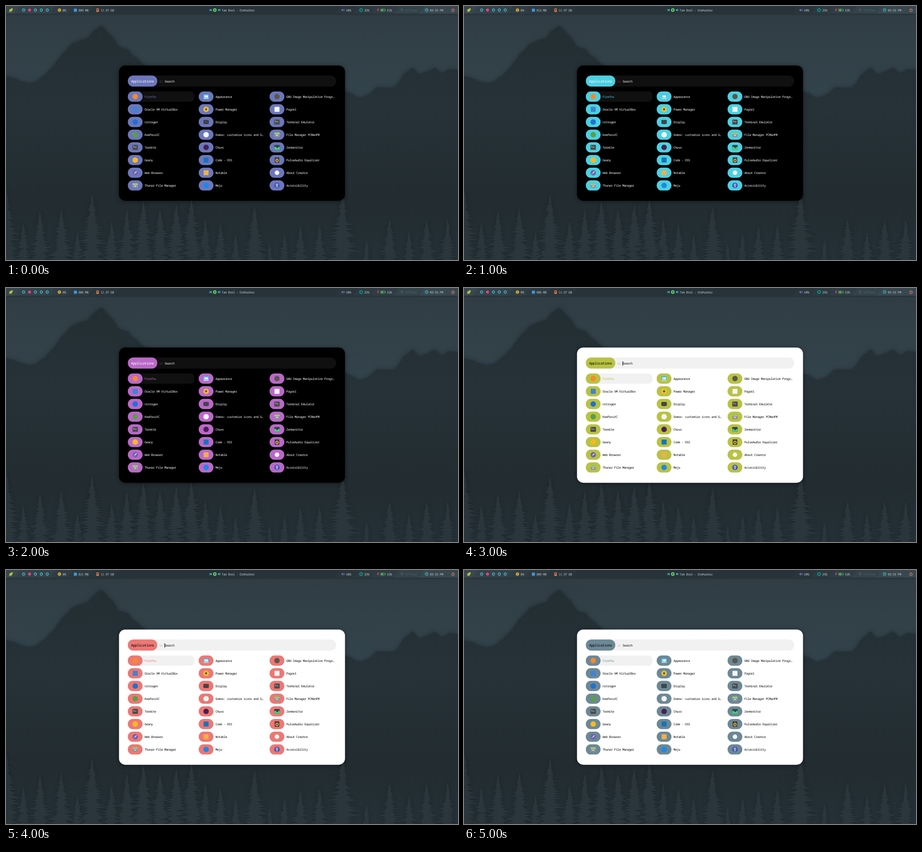
An HTML page that plays this animation: 998x561 px, repeating every 6 s.

```html
<!DOCTYPE html>
<html lang="en">
<head>
<meta charset="utf-8">
<title>Application launcher themes</title>
<style>
html, body { margin: 0; width: 100%; height: 100%; overflow: hidden; background: #232d32; }
svg { display: block; width: 998px; height: 561px; animation: theme 6s step-end infinite; }
text {
  font: 6.75px "Noto Sans Mono", "DejaVu Sans Mono", monospace;
  letter-spacing: -.06em; white-space: pre; text-rendering: geometricPrecision;
}
.bar text { fill: #c3ccd0; }
.bar .muted { fill: #536168; }
.panel { fill: var(--panel); filter: drop-shadow(0 1px 5px rgba(0,0,0,.45)); }
.field { fill: var(--field); }
.accent { fill: var(--accent); }
.ink { fill: var(--ink); }
.title { fill: var(--ink); font-size: 7.8px; }
.caret { fill: #000; opacity: var(--caret); }
.mountains { filter: drop-shadow(0 0 5px rgba(10,18,22,.5)); }
.trees { fill: #2a363c; filter: drop-shadow(0 1px 4px rgba(12,18,22,.4)); }
.bar { filter: drop-shadow(0 1px 2px rgba(0,0,0,.3)); }
.slot { visibility: hidden; animation: slot 6s step-end infinite; }
.charge-low { animation: slot 6s step-end infinite; }
.charge-high { animation: after 6s step-end infinite; }
@keyframes theme {
  0%       { --accent: #6c77bb; --panel: #000; --field: #101010; --ink: #fff; --caret: 0; }
  16.6666% { --accent: #4dd0e1; --panel: #000; --field: #101010; --ink: #fff; --caret: 0; }
  33.3333% { --accent: #ba68c8; --panel: #000; --field: #101010; --ink: #fff; --caret: 0; }
  50%      { --accent: #b9c244; --panel: #fff; --field: #f1f1f1; --ink: #000; --caret: 1; }
  66.6666% { --accent: #ec7875; --panel: #fff; --field: #f1f1f1; --ink: #000; --caret: 1; }
  83.3333%, 100% { --accent: #6d8895; --panel: #fff; --field: #f1f1f1; --ink: #000; --caret: 0; }
}
@keyframes slot { 0% { visibility: visible; } 16.6666%, 100% { visibility: hidden; } }
@keyframes after { 0% { visibility: hidden; } 16.6666%, 100% { visibility: visible; } }
</style>
</head>
<body>
<svg id="stage" viewBox="0 0 998 561" xmlns="http://www.w3.org/2000/svg"></svg>
<script>
const rect = (x, y, w, h, r, fill) =>
  `<rect x="${x}" y="${y}" width="${w}" height="${h}" rx="${r}" fill="${fill}"/>`;
const themed = (cls, x, y, w, h, r) =>
  `<rect class="${cls}" x="${x}" y="${y}" width="${w}" height="${h}" rx="${r}"/>`;
const disc = (x, y, r, fill) => `<circle cx="${x}" cy="${y}" r="${r}" fill="${fill}"/>`;
const ring = (x, y, r, stroke, w = 1) =>
  `<circle cx="${x}" cy="${y}" r="${r}" fill="none" stroke="${stroke}" stroke-width="${w}"/>`;
const shape = (d, fill) => `<path d="${d}" fill="${fill}"/>`;
const line = (d, stroke, w = 1) =>
  `<path d="${d}" fill="none" stroke="${stroke}" stroke-width="${w}" stroke-linecap="round" stroke-linejoin="round"/>`;
const label = (x, y, str, cls = "", style = "") =>
  `<text x="${x}" y="${y}" class="${cls}" style="${style}">${str}</text>`;

let seed = 7;
const random = () => (seed = (seed * 16807) % 2147483647) / 2147483647;

// Adds small bumps along a polyline.
function rugged(points, size = 1.6) {
  const out = [];
  points.forEach(([x, y], i) => {
    out.push(`${x} ${y}`);
    const next = points[i + 1];
    if (!next) return;
    const n = Math.max(1, Math.round(Math.hypot(next[0] - x, next[1] - y) / 6));
    for (let k = 1; k < n; k++) {
      const t = k / n, bump = () => (random() - .5) * 2 * size;
      out.push(`${(x + (next[0] - x) * t + bump()).toFixed(1)} ${(y + (next[1] - y) * t + bump()).toFixed(1)}`);
    }
  });
  return out.join("L");
}

function tree(x, top) {
  return [-1, 1].map(side => {
    let d = `M${x} ${top}`;
    for (let y = top + 5; y < 566; y += 3 + random() * 4) {
      const reach = Math.min(36, (y - top) * .28) * (.55 + random() * .65) + 1;
      d += `L${(x + side * reach * .4).toFixed(1)} ${y.toFixed(1)}`
         + `L${(x + side * reach).toFixed(1)} ${(y + 2 + random() * 3).toFixed(1)}`;
    }
    return d + `L${x} 570Z`;
  }).join("");
}

function landscape() {
  const ridge = rugged([[0, 155], [18, 160], [36, 167], [52, 171], [66, 168], [90, 149], [110, 126],
    [130, 101], [143, 86], [163, 77], [180, 72], [195, 55], [211, 44], [224, 59], [237, 71],
    [248, 91], [270, 96], [279, 109], [305, 130], [360, 180]], 1.1);
  const east = rugged([[700, 160], [748, 189], [766, 196], [782, 204], [800, 196], [819, 180], [858, 181],
    [879, 151], [898, 136], [911, 152], [932, 145], [947, 136], [962, 150], [978, 139], [998, 143]], 1.2);
  const tops = [[0, 402], [38, 479], [75, 452], [122, 447], [158, 496], [190, 415], [233, 474], [267, 449],
    [303, 430], [340, 447], [376, 438], [409, 425], [440, 470], [473, 480], [507, 504], [549, 442],
    [582, 524], [615, 502], [650, 484], [692, 482], [743, 412], [796, 516], [847, 470], [890, 497],
    [929, 470], [975, 470]];
  return `<defs>
    <linearGradient id="sky" x2="0" y2="1"><stop stop-color="#303c43"/><stop offset="1" stop-color="#34454d"/></linearGradient>
    <linearGradient id="rock" gradientUnits="userSpaceOnUse" x1="0" y1="44" x2="0" y2="561">
      <stop stop-color="#232e33"/><stop offset=".35" stop-color="#263238"/>
      <stop offset=".75" stop-color="#222c31"/><stop offset="1" stop-color="#253137"/></linearGradient>
  </defs>` + rect(0, 0, 998, 240, 0, "url(#sky)")
    + `<path class="mountains" fill="url(#rock)" d="M-9 155L${ridge}L${east}L1010 143V580H-9Z"/>`
    + `<path class="trees" d="${tops.map(p => tree(...p)).join("")}"/>`;
}

function topBar() {
  const shades = ["#2a363c", "#2d3a40", "#303d44", "#34424a", "#39484f"];
  const left = [250, 193, 146, 108, 30].map((x, i) => shape(`M0 0H${x}L${x - 12} 17H0Z`, shades[i]));
  const right = [738, 779, 819, 868, 923, 980].map((x, i) =>
    shape(`M998 0H${x}L${x - 12} 17H998Z`, shades[Math.min(i, 4)]));
  const cyan = "#4dd0e1", blue = "#42a5f5", lime = "#b9c244", amber = "#fbc02d", orange = "#e57c46",
    pink = "#ec407a", green = "#61c766", teal = "#00b19f", indigo = "#6c77bb", red = "#ec7875";
  const dots = [39, 52, 65, 78, 91].map((x, i) => i === 1 ? disc(x, 9, 3.2, pink) : ring(x, 9, 2.6, cyan, 1.1));
  const memory = [809, 812, 804, 806, 811, 809].map((mb, i) =>
    label(160, 11.5, mb + " MB", "slot", `animation-delay:${i ? i - 6 : 0}s`));
  return `<g class="bar">` + rect(0, 0, 998, 17, 0, "#273339") + left.join("") + right.join("") + `</g><g class="bar" style="filter:none">`
    + shape("M15 5Q10 5 8 9L7 10L10 13L11.5 12Q15 10 15 5ZM9 7L6.5 8.5L8 9.5ZM13 11L11.5 13.5L10.5 12ZM7 11L6.5 13.5L9 13Z", lime)
    + dots.join("")
    + disc(118, 9, 3.5, amber) + ring(118, 9, 1.5, "#303d44", .8) + label(125, 11.5, "0%")
    + rect(150, 6, 6.5, 6.5, 1, blue) + line("M151.5 7.7H155M151.5 9.2H155M151.5 10.7H155", "#2d6d9e", .4) + memory.join("")
    + rect(199.5, 5.5, 5.5, 7.5, 1, orange) + disc(202.2, 8.5, 1.5, "#2d3a40") + label(209, 11.5, "11.97 GB")
    + shape("M449.5 6.6h1v4.8h-1zM454 6.6V11.4L450.5 9Z", cyan)
    + disc(461, 9, 4, green) + shape("M459.8 7L463 9L459.8 11Z", "#273339")
    + shape("M468.5 6.6V11.4L472 9ZM472 6.6h1v4.8h-1z", cyan) + label(476, 11.5, "Tam Brel - Dimharbor")
    + shape("M740.5 7.8H742L744.2 6V12.2L742 10.3H740.5Z", indigo)
    + line("M745.5 7.8Q746.4 9 745.5 10.3M746.7 6.5Q748.6 9 746.7 11.6", indigo, .8) + label(751, 11.5, "68%")
    + ring(784, 9, 2.9, teal, 1.1)
    + `<circle cx="784" cy="9" r="3.8" fill="none" stroke="${teal}" stroke-width=".8" stroke-dasharray="1.4 1.58"/>` + label(791, 11.5, "25%")
    + shape("M822 5L819 9.5H821L820 13L823.5 8.2H821.5L823.5 5Z", pink)
    + `<rect x="827" y="6.6" width="9.5" height="5" rx=".8" fill="none" stroke="${green}" stroke-width=".8"/>`
    + rect(828.2, 7.8, 5, 2.6, 0, green) + rect(837, 8, 1, 2.2, 0, green)
    + label(841, 11.5, "51%", "charge-low") + label(841, 11.5, "52%", "charge-high")
    + line("M870.5 8Q874.3 4.9 878 8M872 9.8Q874.3 7.8 876.6 9.8", "#5d6b72", .9) + disc(874.3, 11.6, .9, "#5d6b72")
    + label(882, 11.5, "Offline", "muted")
    + ring(928.6, 9, 3.2, cyan, 1) + line("M928.6 7V9.2L930 8.5", cyan, .8) + label(936, 11.5, "03:55 PM")
    + line("M985.3 7A3 3 0 1 0 988.7 7M987 5.3V8.7", red, 1.1) + "</g>";
}

// Icons are drawn around the origin, about 12 px across.
const round = color => disc(0, 0, 6, color);
const square = color => rect(-5.5, -5.5, 11, 11, 1, color);
const icons = {
  terminal: rect(-6, -5.5, 12, 11, 1.5, "#4a4b4e") + line("M-3.7 -2.7L-2 -1.5L-3.7 -.3M-.6 -.3H2.2", "#f0f0f0", .9),
  cabinet: rect(-5.8, -5.3, 11.6, 10.6, 1, "#8f9493") + rect(-5.8, -5.3, 11.6, 3.2, 1, "#8bc05a")
    + rect(-5.8, -2.6, 11.6, 1, 0, "#d9dedb") + rect(-2.2, .6, 4.4, 1.6, .5, "#f1f1f1"),
  compass: round("#6d62ad") + shape("M4 -4L1 1L-1 -1Z", "#eceff1") + shape("M-4 4L1 1L-1 -1Z", "#b9a7d8"),
  window: rect(-5.8, -5, 11.6, 10, 1, "#3daee9") + rect(-4.7, -3.5, 9.4, 6, 0, "#a8def8")
    + rect(-1.5, -1.8, 5.5, 3, 0, "#f4fbff") + rect(-5.8, 3.4, 11.6, 1.6, .5, "#e4e8ea"),
  power: round("#f9c22e") + shape("M1 -4.2L-3.2 .8H-.4L-1.2 4.2L3.2 -1H.3Z", "#3d3d3d"),
  display: rect(-5.8, -4.5, 11.6, 8.6, .8, "#303338") + rect(-4.8, -3.5, 9.6, 6.2, 0, "#44474c")
    + rect(-2.5, 4.1, 5, .9, 0, "#55585c"),
  graph: rect(-6, -5.3, 12, 10.6, 1.5, "#39414a") + shape("M-6 0Q-3.5 -3 -1.5 0T2 1Q4 -3 6 0V4Q6 5.3 4.5 5.3H-4.5Q-6 5.3 -6 4Z", "#43d17a"),
  speaker: rect(-5, -6, 10, 12, 1, "#393b3f") + disc(0, 1, 3.4, "#f5b92c") + disc(0, 1, 1.7, "#393b3f") + disc(0, -4, 1, "#777a7d"),
  person: round("#3f51b5") + disc(0, -3.1, 1.1, "#fff")
    + line("M-3 -1.2L0 -.9L3 -1.2M0 -.9V1L-1.6 4M0 1L1.6 4", "#fff", 1)
};

const columns = [
  [["Firefox", round("#f58a2c")], ["Oracle VM VirtualBox", square("#3f83d2")], ["nitrogen", round("#1d72d2")],
   ["KeePassXC", round("#5a9f45")], ["Termite", icons.terminal], ["Geany", round("#f9b91f")],
   ["Web Browser", icons.compass], ["Thunar File Manager", icons.cabinet]],
  [["Appearance", icons.window], ["Power Manager", icons.power], ["Display", icons.display],
   ["Oomox: customize icons and G…", round("#f4f4f4")], ["Chuvo", round("#4a1f55")], ["Code - OSS", square("#1674bd")],
   ["Notable", square("#eeb04e")], ["Meju", round("#1e88e5")]],
  [["GNU Image Manipulation Progr…", round("#5c564b")], ["Pagrel", square("#f5f5f5")], ["Terminal Emulator", icons.terminal],
   ["File Manager PCManFM", icons.cabinet], ["Zenmonitor", icons.graph], ["PulseAudio Equalizer", icons.speaker],
   ["About Creator", disc(0, 0, 5, "#f5f5f5")], ["Accessibility", icons.person]]
];

function launcher() {
  const items = columns.flatMap((apps, col) => apps.map(([name, icon], row) => {
    const x = 269 + col * 156.5, y = 188.8 + row * 28.03, selected = !col && !row;
    return (selected ? themed("field", x, y, 147, 22.6, 9) : "")
      + themed("accent", x, y, 32.5, 22.6, 11)
      + `<g transform="translate(${x + 16.3} ${y + 11.3})">${icon}</g>`
      + label(x + 37, y + 13.8, name, selected ? "accent" : "ink");
  }));
  return themed("panel", 249.5, 131.5, 499, 298.7, 14)
    + themed("field", 269, 153.6, 460, 24.3, 12)
    + themed("accent", 269, 153.6, 65, 24.3, 12)
    + label(276.3, 168.8, "Applications", "title")
    + label(338.3, 169.3, "::", "ink") + label(350, 169.3, "Search", "ink")
    + themed("caret", 350, 162, 1.1, 9.5, 0) + items.join("");
}

document.getElementById("stage").innerHTML = landscape() + topBar() + launcher();
</script>
</body>
</html>
```
